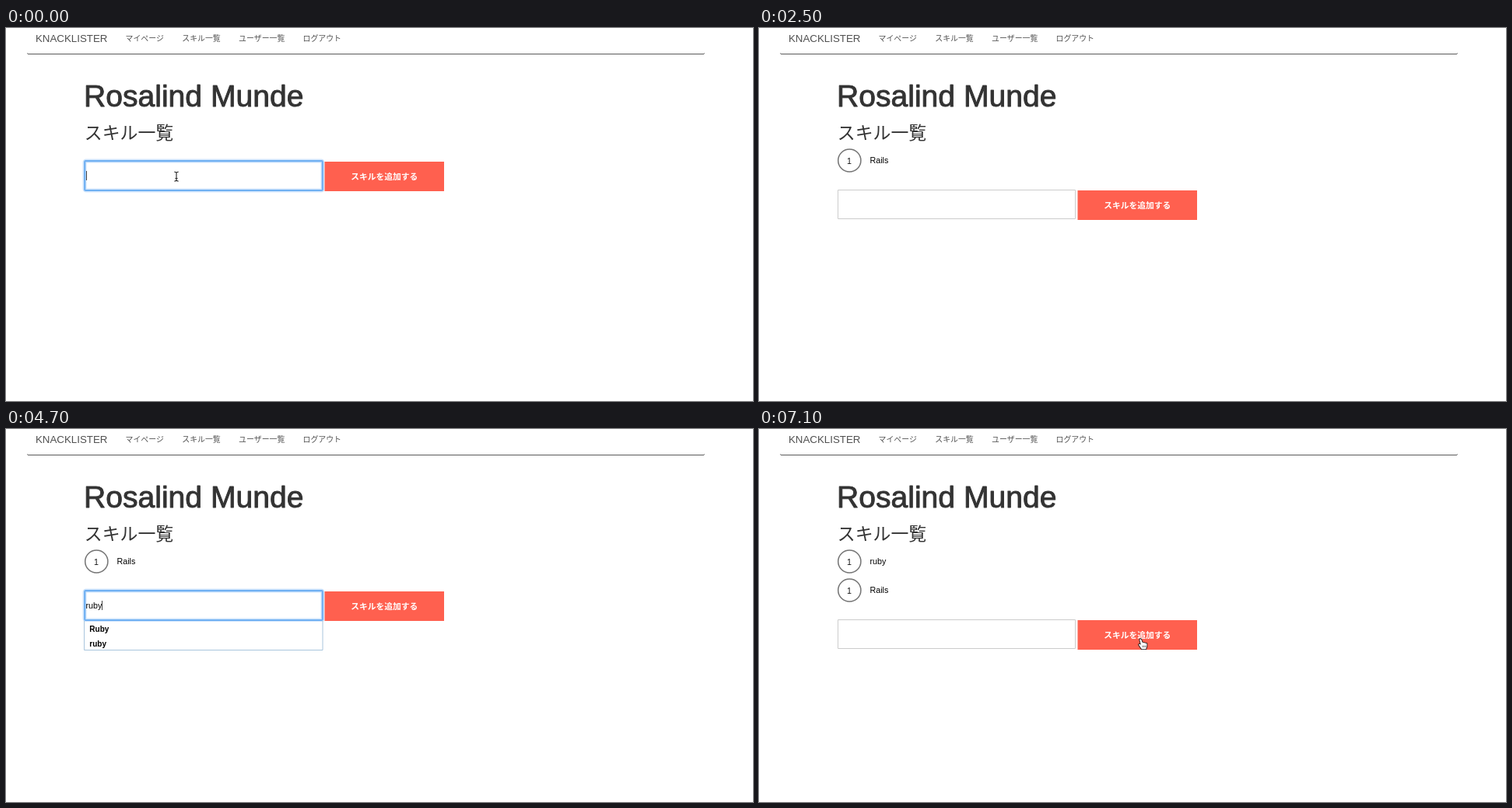
Animation, 960 px wide and 480 px high, one loop 7.2 s. Source, as an HTML page with a canvas:

```html
<!DOCTYPE html>
<html lang="ja">
<head>
<meta charset="utf-8">
<title>スキル一覧</title>
<style>
html, body { margin: 0; width: 100%; height: 100%; overflow: hidden; background: #fff; }
canvas { display: block; width: 960px; height: 480px; }
</style>
</head>
<body>
<canvas id="stage" width="960" height="480"></canvas>
<script>
const ctx = document.getElementById('stage').getContext('2d', { alpha: false });
const LOOP = 7200, STEP = 100, KEY = 120, ROW = 37;
const LATIN = '"Liberation Sans", Arial, sans-serif';
const KANA = '"Noto Sans CJK JP", "Noto Sans CJK", sans-serif';
const known = ['Rails', 'rails', 'Ruby', 'ruby'];

// Each entry: focus the field, type a prefix, pick a suggestion, submit
const entries = [
  { focus: 0, type: 700, prefix: 'Ra', pick: 1600, word: 'Rails', submit: 2300 },
  { focus: 3900, type: 4300, prefix: 'ruby', pick: 4900, word: 'ruby', submit: 5300 }
];

// Pointer moves, each eased from the place where the last one ended
const origin = { x: 219, y: 191 };
const moves = [
  { from: 3200, to: 3400, x: 164, y: 255 },
  { from: 3400, to: 3650, x: 86, y: 245 },
  { from: 3650, to: 3900, x: 150, y: 228 },
  { from: 5300, to: 5600, x: 316, y: 162 },
  { from: 5600, to: 6700, x: 491, y: 270 }
];

const ease = u => u * u * (3 - 2 * u);
const clamp = u => Math.min(1, Math.max(0, u));

function text(str, x, y, size, color, font = LATIN, weight = 400, align = 'left') {
  ctx.font = `${weight} ${size}px ${font}`;
  ctx.textAlign = align;
  ctx.fillStyle = color;
  ctx.fillText(str, x, y);
}

function stroke(color, width) {
  ctx.strokeStyle = color;
  ctx.lineWidth = width;
  ctx.stroke();
}

function line(x0, y0, x1, y1, color, width = 1) {
  ctx.beginPath();
  ctx.moveTo(x0, y0);
  ctx.lineTo(x1, y1);
  stroke(color, width);
}

function box(x, y, w, h, r, color, width) {
  ctx.beginPath();
  ctx.roundRect(x, y, w, h, r);
  stroke(color, width);
}

function page() {
  ctx.fillStyle = '#fff';
  ctx.fillRect(0, 0, 960, 480);
  text('KNACKLISTER', 38, 18, 13.3, '#505050');
  let x = 153.6;
  for (const label of ['マイページ', 'スキル一覧', 'ユーザー一覧', 'ログアウト']) {
    text(label, x, 17.4, 9.9, '#505050', KANA);
    x += label.length * 9.9 + 23.2;
  }
  line(28, 33.5, 897, 33.5, '#5a5a5a', 1.2);
  line(27, 32.5, 28.5, 33.3, '#777');
  line(896.5, 33.3, 898, 32.5, '#777');

  const name = 'Rosalind Munde';
  text(name, 100, 101, 39.1, '#333');
  ctx.strokeStyle = '#333';
  ctx.lineWidth = 0.9;
  ctx.lineJoin = 'round';
  ctx.strokeText(name, 100, 101);
  text('スキル一覧', 100.8, 143, 22.9, '#333', KANA);
}

function skill(name, i) {
  const y = 170.5 + i * ROW;
  ctx.beginPath();
  ctx.arc(116.3, y, 14.6, 0, 7);
  stroke('#747474', 1.5);
  text('1', 116, y + 4, 10.7, '#111', LATIN, 400, 'center');
  text(name, 142.5, y + 3, 10.7, '#000');
}

function form(top, value, focused, caret) {
  if (focused) {
    box(101, top, 306, 38, 2, 'rgba(120,180,245,.35)', 5);
    box(101.2, top + .2, 305.6, 37.8, 1, '#70b0f2', 2.2);
  } else {
    box(101.5, top + .5, 305, 37, 0, '#ccc', 1);
  }
  ctx.fillStyle = '#ff604f';
  ctx.fillRect(409.5, top + 1, 153.5, 38);
  text('スキルを追加する', 486.2, top + 23.6, 10.75, '#fff', KANA, 700, 'center');
  text(value, 102.5, top + 23, 10.7, '#000');
  if (caret) {
    const x = Math.round(102.5 + ctx.measureText(value).width) + .5;
    line(x, top + 13, x, top + 25, '#444');
  }
}

function menu(top, rows) {
  const h = rows.length * 18.5 + 1;
  ctx.fillStyle = '#fff';
  ctx.fillRect(101, top + 40, 306, h - 1);
  ctx.save();
  ctx.beginPath();
  ctx.rect(90, top + 39, 330, h + 2);
  ctx.clip();
  box(100.5, top + 38.5, 306.5, h, 0, '#a9c6dd', 1);
  ctx.restore();
  rows.forEach((row, i) => text(row, 107.3, top + 53.1 + i * 18.5, 10, '#000', LATIN, 700));
}

function beam() {
  for (const [color, width] of [['#fff', 2.6], ['#222', 1.1]]) {
    line(0, -5, 0, 5.4, color, width);
    for (const side of [-1, 1]) {
      line(0, -5, side * 2.6, -6, color, width);
      line(0, 5.4, side * 2.6, 6.2, color, width);
    }
  }
  line(-1.6, 2.6, 1.6, 2.6, '#222');
}

function arrow() {
  const p = new Path2D('M0 0V9.6L2.2 7.7L4 11.8L5.6 11.1L3.9 7.1L6.8 6.8Z');
  ctx.strokeStyle = '#fff';
  ctx.lineWidth = 1.2;
  ctx.stroke(p);
  ctx.fillStyle = '#000';
  ctx.fill(p);
}

function hand() {
  const p = new Path2D('M-1.8 1Q-.8 -.6 .3 1L1.5 4.6L7.4 6V9L6.3 13.2H.8L-3 7.6Q-2.2 6 -.2 7.8Z');
  ctx.lineJoin = 'round';
  ctx.strokeStyle = '#111';
  ctx.lineWidth = 1.7;
  ctx.stroke(p);
  ctx.fillStyle = '#fff';
  ctx.fill(p);
  for (let i = 0; i < 3; i++) line(2 + i * 1.8, 8.6, 2.1 + i * 1.8, 11, '#333', .7);
}

function pointer(t, top) {
  // Typing hides the pointer until it moves again
  const moved = moves.filter(m => m.from < t).pop();
  const typed = entries.filter(e => e.type <= t).pop();
  if (typed && (!moved || moved.from < typed.type)) return;

  let { x, y } = origin;
  for (const m of moves) {
    const u = ease(clamp((t - m.from) / (m.to - m.from)));
    x += (m.x - x) * u;
    y += (m.y - y) * u;
  }
  const inside = y > top && y < top + 39;
  const cursor = inside && x > 101 && x < 407 ? beam : inside && x > 409 && x < 563 ? hand : arrow;
  ctx.save();
  ctx.translate(x, y);
  cursor();
  ctx.restore();
}

function draw(now) {
  const t = Math.floor(now % LOOP / STEP) * STEP;
  const skills = entries.filter(e => e.submit <= t).map(e => e.word).reverse();
  const top = 171 + skills.length * ROW;
  const entry = entries.find(e => t >= e.focus && t < e.submit);
  let value = '', rows = [], caret = false;

  if (entry) {
    const { focus, type, prefix, pick, word } = entry;
    const since = t >= pick ? pick : t >= type ? type : focus;
    caret = (t - since) % 1000 < 500;
    if (t >= pick) {
      value = word;
    } else if (t >= type) {
      value = prefix.slice(0, 1 + Math.floor((t - type) / KEY));
      rows = known.filter(k => k.toLowerCase().startsWith(value.toLowerCase()));
    }
  }

  page();
  skills.forEach(skill);
  form(top, value, !!entry, caret);
  if (rows.length) menu(top, rows);
  pointer(t, top);
}

const start = performance.now();
function tick() {
  draw(performance.now() - start);
  requestAnimationFrame(tick);
}
tick();
</script>
</body>
</html>
```
